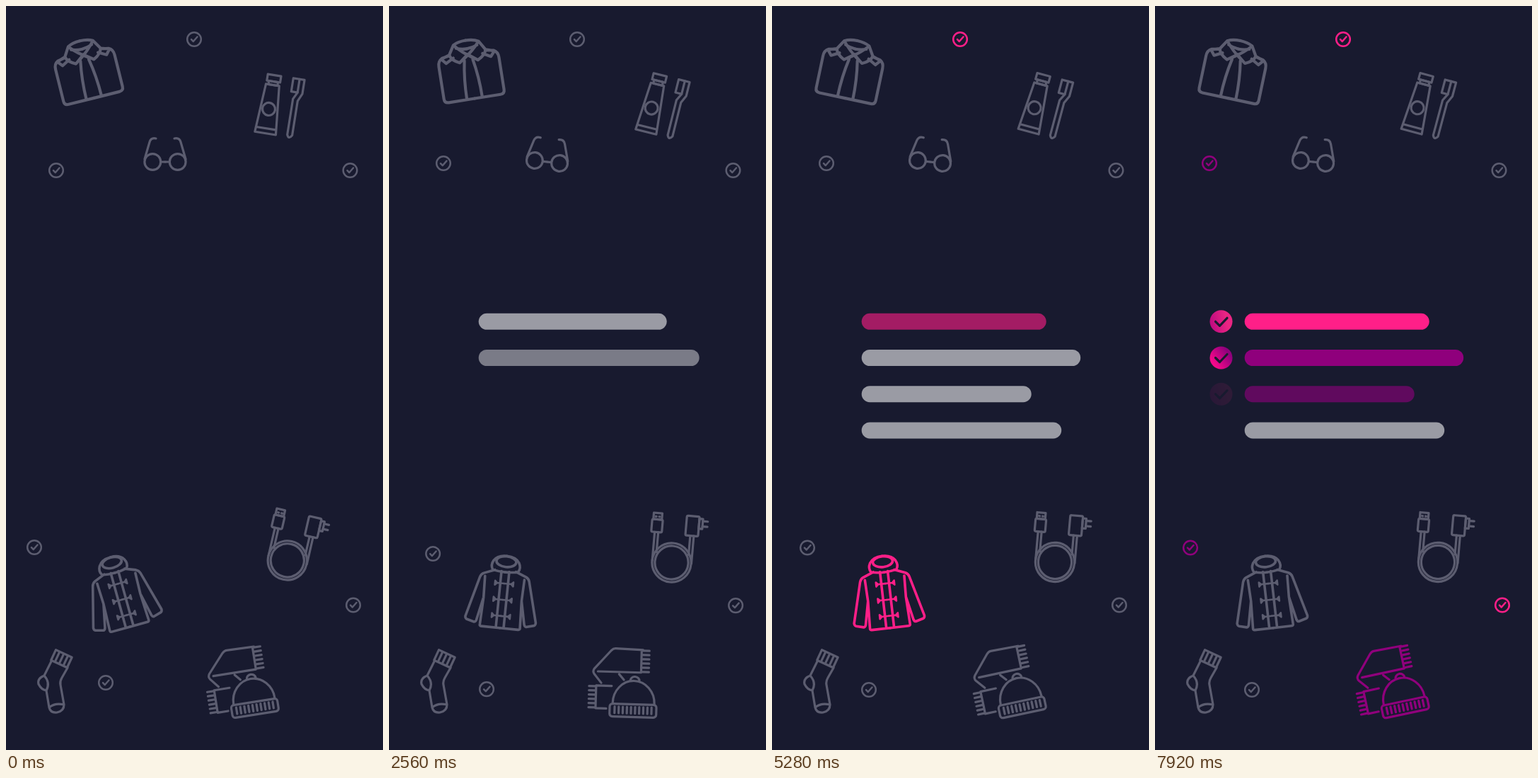
These frames come from a looping animation (533x1050 px, 8000 ms). An HTML page:

```html
<!DOCTYPE html>
<html lang="en">
<head>
<meta charset="utf-8">
<style>
  html, body { margin: 0; width: 100%; height: 100%; overflow: hidden; background: #181a2f; }
  svg { display: block; width: 100vw; height: 100vh; }
  .line { fill: none; stroke-width: 3.2; stroke-linecap: round; stroke-linejoin: round; }
</style>
</head>
<body>
<svg id="stage" viewBox="0 0 533 1050">
  <defs>
    <linearGradient id="grad0" x1="0" y1=".6" x2="1" y2=".4">
      <stop offset="0" stop-color="#bd0a80"/><stop offset=".75" stop-color="#ea2583"/>
    </linearGradient>
    <linearGradient id="grad1" x1=".1" y1=".8" x2=".9" y2=".2">
      <stop offset=".1" stop-color="#f5088a"/><stop offset=".9" stop-color="#8f007c"/>
    </linearGradient>
  </defs>
</svg>
<script>
const LOOP = 8000, GRAY = '#5c5d70', PINK = '#ff1f88', PURPLE = '#8f007c';
const stage = document.getElementById('stage');

function add(tag, attrs, inner = '') {
  const el = document.createElementNS('http://www.w3.org/2000/svg', tag);
  for (const k in attrs) el.setAttribute(k, attrs[k]);
  el.innerHTML = inner;
  stage.append(el);
  return el;
}
const path = (d, more = '') => `<path d="${d}" ${more}/>`;
const circle = (x, y, r) => `<circle cx="${x}" cy="${y}" r="${r}"/>`;
const rect = (x, y, w, h, r = 0) => `<rect x="${x}" y="${y}" width="${w}" height="${h}" rx="${r}"/>`;
const group = (transform, art) => `<g transform="${transform}">${art}</g>`;
const mirror = art => art + group('scale(-1 1)', art);
const repeat = (n, make) => Array.from({ length: n }, (_, i) => make(i)).join('');
const fringe = (x, y) => path(repeat(6, i => `M${x} ${y + 6 * i}h9`));

// Art is drawn upright around its pivot; symmetric art only as its right half.
const shirt = mirror(path(`M27 -26L37 -24Q43 -21 43 -13V33Q43 39 37 39H0
  M0 -44Q11 -44 18 -40L26 -27Q24 -19 13 -14L0 -24M18 -40Q8 -28 -7 -18M15 -35Q8 -32 0 -32
  M26 -27L38 -23L32 -16L21 -22M6 -16Q11 10 11 39`, 'stroke-width="4.2"'));

const toothbrush = rect(-24.5, -41, 19, 9) + rect(-21.5, -32, 13, 5) + path('M-25 -27H-6L0 42H-30ZM-29 35H-1') +
  circle(-15.5, 7.5, 9) + rect(12, -41, 9, 19) + path('M21 -41H28V-21L23 -10V39Q19 46 16 39V-12L21 -22');

const glasses = mirror(circle(17.7, 0, 11.4) + path('M0 0H6M29 -4L22 -28Q20 -34.5 13 -33'));

const cable = circle(0, 23, 27.6) + circle(0, 23, 23.6) +
  rect(-31, -45, 12, 9) + rect(-32.5, -36, 15, 18, 2) + rect(16, -45, 18, 28, 2) + rect(34, -42, 5, 14) +
  path('M-28 -40h1M-23 -40h1M39 -39h7M39 -31.5h7M-27.5 -18V22M-22.5 -18V10M23 -17V10M28 -17V22');

const coat = `<g stroke-width="3.6">${mirror(path(`M0 -52Q13 -52 18 -44Q22 -37 18 -31Q9 -29 0 -29
  M15 -31L30 -25Q34 -23 35 -19L50 38Q50 41 48 42L37 45Q35 45 34 42L27 9
  M28 -21L27 9L28.5 47Q29 50 26 50H0M5.5 -30V50`))}<ellipse cy="-44" rx="14" ry="7.5"/></g>` +
  repeat(3, i => group(`translate(0 ${23 * i - 13})`, mirror(path('M0 0H10M13 -3L10 0L13 3Z', 'stroke-width="2.6"'))));

const sock = group('rotate(25 78 921)', rect(66, 913, 25, 16) + path('M72 914V927M78.5 914V927M85 914V927')) +
  path(`M64 925L54 945Q44 949 46 957Q50 965 57 966Q63 955 54 945
    M57 966L61 990Q63 998 72 997Q82 995 82 986L77 958Q76 953 79 948L87 934M61 990Q69 983 82 986`);

const scarf = group('rotate(2) translate(-330 -955)', path(`M358 908L319 907Q316 907 313 910L290 936Q287 940 290 944
  L300 956M295 940L356 940V908M325 943L332 951M315 960H293V992H308`) + fringe(358, 909) + fringe(283, 961) +
  path('M317 984A29.5 32 0 0 1 376 984M341 952A6.5 6 0 0 1 354 952') + rect(313, 985, 66, 18, 4) +
  path(repeat(10, i => `M${320 + 5.8 * i} 989v9`)));

const tick = circle(0, 0, 9.8) + path('M-4 .2L-1.2 3L4.5 -3.5');

const clamp = v => Math.max(0, Math.min(1, v));
const smooth = v => v * v * (3 - 2 * v);
const ease = (t, from, to) => smooth(clamp((t - from) / (to - from)));
const bump = (t, peak) => Math.cos(Math.PI / 2 * clamp(Math.abs(t - peak) / 1400)) ** 2;

// An icon eases from its first pose (x, y, angle) to its last within [begin, end],
// and swings out by `detour` and back around the time `peak`.
function icon(art, from, to = from, [begin, end] = [800, 1600], detour = [0, 0, 0], peak = 0) {
  const el = add('g', { class: 'line', style: art === tick ? 'stroke-width:2.5' : '' }, art);
  const pose = t => from.map((v, i) => v + (to[i] - v) * ease(t, begin, end) + detour[i] * bump(t, peak));
  return { el, pose };
}

const EARLY = [800, 1600], MIDDLE = [1700, 2600], LATE = [4000, 5040];
const icons = {
  shirt: icon(shirt, [115, 92, -14], [111.5, 92, 12], LATE, [0, 0, 5], 2560),
  brush: icon(toothbrush, [388, 140.5, 9], [388, 140.5, 15], EARLY, [0, 0, -12], 3700),
  glasses: icon(glasses, [225, 220, 0], [223.5, 220, 6.5], MIDDLE),
  cable: icon(cable, [403, 760, 13], [402, 762, 5], EARLY, [-6, 7, 0], 3700),
  coat: icon(coat, [161.5, 828, -15.5], [161.5, 828, -6.5], MIDDLE, [0, 0, 15], 2950),
  sock: icon(sock, [0, 0, 0]),
  scarf: icon(scarf, [330, 955, -11], [330, 955, -14], MIDDLE, [0, 0, 24], 3200),
  tickTop: icon(tick, [266, 47, 0]),
  tickLeft: icon(tick, [71, 232, 0], [77, 222, 0], MIDDLE),
  tickFar: icon(tick, [486.5, 232, 0]),
  tickLow: icon(tick, [40, 764, 0], [50, 764.5, 0], EARLY, [13.5, 9.5, 0], 2850),
  tickRight: icon(tick, [491, 845.5, 0], undefined, EARLY, [-16, 11, 0], 3750),
  tickFloor: icon(tick, [141, 955, 0], [137, 965, 0], EARLY, [19.5, -15, 0], 3750),
};

// Icon and bar change colour together; the icon glows for one step, ticks stay lit.
const FIRST_DONE = 5265, STEP = 1120;
const highlights = [
  { name: 'coat', color: PINK, ticks: { tickTop: PINK } },
  { name: 'brush', color: PURPLE, ticks: { tickLow: PURPLE, tickRight: PINK } },
  { name: 'scarf', color: PURPLE, ticks: { tickLeft: PURPLE } },
];

const bars = [261, 309.5, 240, 282.5].map((width, i) => {
  const y = 445.3 + 51.2 * i;
  const el = add('rect', { x: 126.7, y: y - 11.5, height: 23, rx: 11.5 });
  const badge = add('g', { transform: `translate(93.5 ${y})` },
    `<circle r="16" fill="url(#grad${i % 2})"/>` + path('M-8 0L-2 6L8.5 -5', 'class="line" stroke="#181a2f"'));
  return { width, el, badge };
});

function draw(t) {
  const paint = (name, color) => icons[name].el.setAttribute('stroke', color);
  for (const name in icons) {
    const { el, pose } = icons[name], [x, y, angle] = pose(t);
    el.setAttribute('transform', `translate(${x} ${y}) rotate(${angle})`);
    paint(name, GRAY);
  }
  bars.forEach(({ el, badge, width }, i) => {
    const age = t - FIRST_DONE - STEP * i;
    const lit = age >= 0 && highlights[i];
    const fade = lit ? clamp((age - 375) / 400) : 0;
    if (lit) {
      if (age < STEP) paint(lit.name, lit.color);
      for (const name in lit.ticks) paint(name, lit.ticks[name]);
    }
    const extra = 20 / (i + 1) * (Math.max(0, 3680 - t) / 2240) ** 2;
    el.setAttribute('width', width + extra);
    el.setAttribute('fill', lit ? lit.color : '#fff');
    el.setAttribute('opacity', lit ? 0.6 + 0.4 * smooth(fade) : 0.565 * clamp((t - 800 - 1200 * i) / 750));
    badge.setAttribute('opacity', fade);
  });
}

const start = performance.now();
function frame() {
  draw((performance.now() - start) % LOOP);
  requestAnimationFrame(frame);
}
frame();
</script>
</body>
</html>
```
